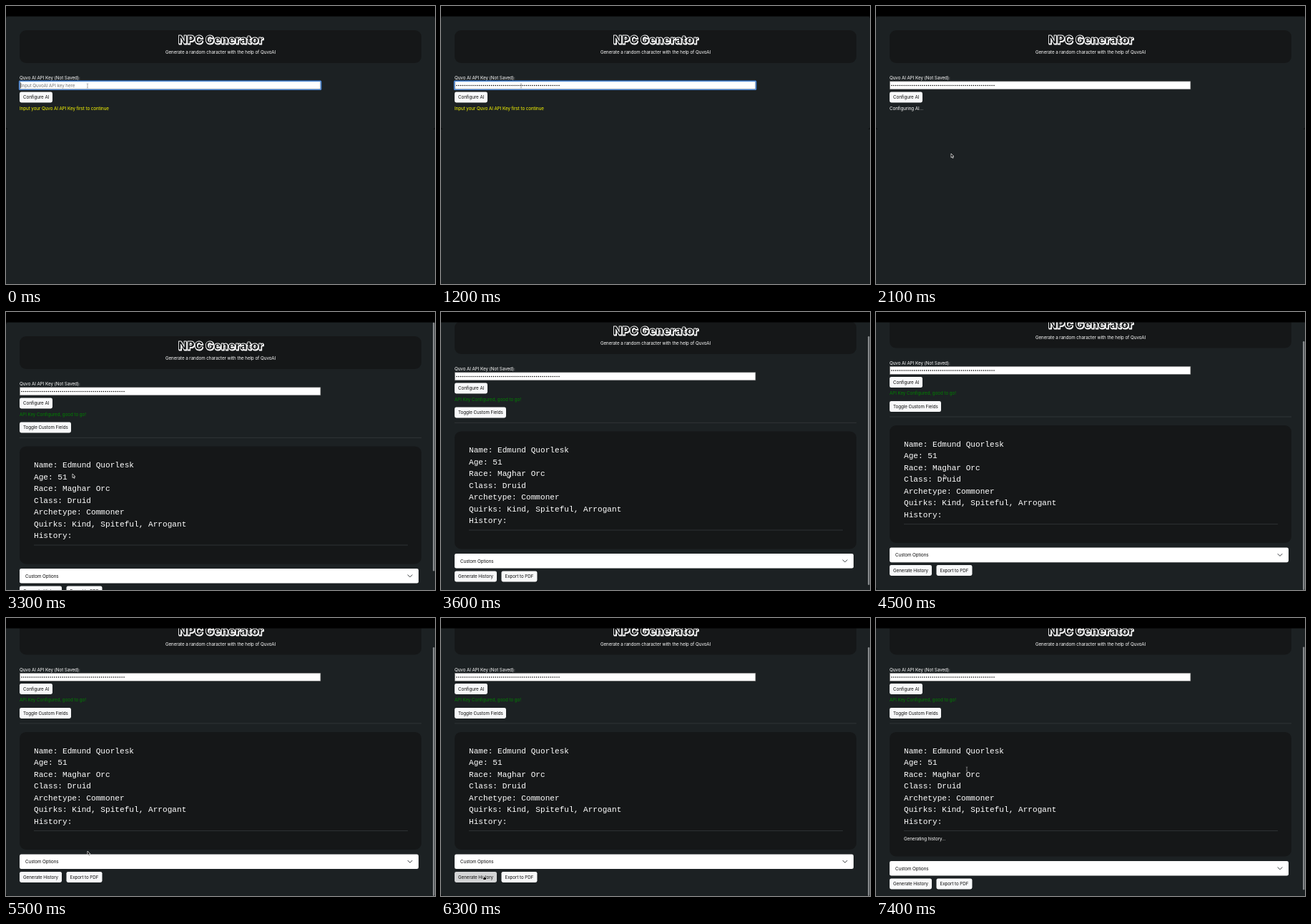
An HTML page for the animation above (8 s loop, 600 by 390 pixels).

```html
<!DOCTYPE html>
<html lang="en">
<head>
<meta charset="utf-8">
<title>NPC Generator</title>
<style>
  html, body { margin: 0; width: 100%; height: 100%; overflow: hidden; background: #000; }
  svg { display: block; width: 600px; height: 390px; }
  text { font: 6.25px Inter, sans-serif; letter-spacing: -.01em; fill: #fff; white-space: pre; }
  .title { font: 900 16px Inter, sans-serif; letter-spacing: 0; text-anchor: middle; stroke-linejoin: round; }
  .back { fill: #fff; stroke: #fff; stroke-width: 1; }
  .front { fill: #151718; stroke: #fff; stroke-width: .8; }
  .mid { text-anchor: middle; }
  .mono text { font: 11.11px "Liberation Mono", monospace; letter-spacing: 0; }
  .panel { fill: #151718; }
  .rule { stroke: #393d3f; stroke-width: .7; }
  .btn rect { fill: #f8f9fa; }
  .btn.hover rect { fill: #d3d4d5; }
  .btn text, .dark { fill: #0b0b0b; }
  #hint { fill: #757575; }
  #dots { stroke: #000; stroke-width: 1.6; stroke-linecap: round; stroke-dasharray: 0 2.86; }
  #ring { fill: none; stroke: #4a8ade; stroke-width: 1.4; }
  .cursor { stroke: #fff; stroke-width: .7; stroke-linejoin: round; }
</style>
</head>
<body>
<svg viewBox="0 0 600 390">
  <rect width="600" height="390" fill="#1c2123"/>
  <g id="page">
    <rect id="edge" y="14.5" width="600" fill="#090b0c"/>
    <rect id="sheet" y="14.5" width="600" rx="4" fill="#1c2123"/>

    <rect class="panel" x="19" y="34" width="562" height="46" rx="9"/>
    <text class="title back" x="301.1" y="53.6">NPC Generator</text>
    <text class="title front" x="300.4" y="52.8">NPC Generator</text>
    <text class="mid" x="300" y="67.2">Generate a random character with the help of QuvoAI</text>

    <text x="19" y="103">Quvo AI API Key (Not Saved):</text>
    <rect x="19.3" y="105.8" width="420.6" height="11" fill="#fff" stroke="#767676" stroke-width=".6"/>
    <rect id="ring" x="18.6" y="105.2" width="422" height="12.2" rx=".8"/>
    <text id="hint" x="21" y="113.7">Input QuvoAI API key here</text>
    <path id="dots" d="M22 111.5H165.5"/>
    <path id="caret" d="M0 107.5v7.6" stroke="#222" stroke-width=".7"/>
    <g class="btn" id="configure">
      <rect x="19" y="120.5" width="46" height="15" rx="2.4"/>
      <text x="24" y="130.3">Configure AI</text>
    </g>
    <text id="status" x="19" y="145.8"></text>

    <g id="result">
      <g class="btn">
        <rect x="19" y="154.5" width="72" height="15" rx="2.4"/>
        <text x="24" y="164.3">Toggle Custom Fields</text>
      </g>
      <path class="rule" d="M19 176.4H581"/>
      <rect id="card" class="panel" x="19" y="188.4" width="562" rx="9"/>
      <g class="mono" id="facts"></g>
      <path class="rule" d="M39 327H562"/>
      <text id="history" x="39" y="340.6">Generating history...</text>
      <g id="tail">
        <rect x="19" y="360" width="558" height="20.6" rx="2.4" fill="#fff"/>
        <text class="dark" x="27" y="372.5">Custom Options</text>
        <path d="M562 368.8l3 3 3-3" fill="none" stroke="#212529" stroke-width=".9" stroke-linecap="round" stroke-linejoin="round"/>
        <g class="btn" id="generate">
          <rect x="19" y="384.4" width="59" height="15" rx="2.4"/>
          <text x="24" y="394.2">Generate History</text>
        </g>
        <g class="btn">
          <rect x="84.5" y="384.4" width="50" height="15" rx="2.4"/>
          <text x="89.5" y="394.2">Export to PDF</text>
        </g>
      </g>
    </g>
  </g>
  <rect id="thumb" x="597" width="2.4" rx="1.2" fill="#85888a"/>
  <rect width="600" height="14.5"/>

  <g id="mouse">
    <path id="arrow" class="cursor" d="M0 0V5.6L1.3 4.4 2.2 6.5 3.2 6 2.3 4H4Z"/>
    <path id="hand" class="cursor" d="M-.6 0Q0-.7 .6 0V2.3L3 2.9Q3.6 3.1 3.5 4L3 6.5H-.4L-2 4Q-1.5 3-.6 4Z"/>
    <g id="beam" fill="none">
      <path d="M-1.2-3Q0-3 0-2.3Q0-3 1.2-3M0-2.3V2.3M-1.2 3Q0 3 0 2.3Q0 3 1.2 3" stroke="#999" stroke-width=".8"/>
    </g>
  </g>
</svg>
<script>
const LOOP = 8000, STEP = 100, VIEW = 375.5, TOP = 14.5;
const $ = id => document.getElementById(id);
const show = (id, on) => $(id).style.display = on ? '' : 'none';
const set = (id, name, value) => $(id).setAttribute(name, value);

const facts = ['Name: Edmund Quorlesk', 'Age: 51', 'Race: Maghar Orc', 'Class: Druid',
  'Archetype: Commoner', 'Quirks: Kind, Spiteful, Arrogant', 'History:'];
$('facts').innerHTML = facts.map((line, i) =>
  `<text x="39" y="${218.4 + i * 16.5}">${line}</text>`).join('');

// Stops are [time, value, ...], joined by straight segments.
const scrollStops = [[3400, 0], [3500, 10], [3600, 21], [3700, 28], [3800, 30],
  [3900, 29.8], [4500, 29.4], [5200, 28.5]];
const mouseStops = [[0, 114, 112], [1200, 112, 112], [1500, 46, 128], [1900, 46, 128],
  [2000, 80, 180], [2100, 105, 207], [3100, 105, 207], [3300, 93, 227], [4300, 93, 227],
  [4400, 95, 228], [5200, 95, 228], [5300, 114, 327], [5500, 114, 327], [5900, 60, 361],
  [6900, 60, 361], [7200, 105, 265], [7400, 127, 212]];

function at(stops, t) {
  const next = stops.findIndex(s => s[0] > t);
  if (next === 0) return stops[0].slice(1);
  if (next < 0) return stops[stops.length - 1].slice(1);
  const a = stops[next - 1], b = stops[next], k = (t - a[0]) / (b[0] - a[0]);
  return a.slice(1).map((v, i) => v + (b[i + 1] - v) * k);
}

function status(t) {
  if (t < 1600) return ['Input your Quvo AI API Key first to continue', '#ff0'];
  if (t < 2600) return ['Configuring AI...', '#fff'];
  return ['API Key Configured, good to go!', '#008000'];
}

function draw(t) {
  const pasted = t >= 700, focused = t < 1600, ready = t >= 2600, writing = t >= 7000;
  const grow = writing ? 9.5 : 0;
  const height = (ready ? 404 : 158.5) + grow;
  const [scroll] = at(scrollStops, t), [x, y] = at(mouseStops, t);

  set('page', 'transform', `translate(0 ${-scroll})`);
  set('edge', 'height', height);
  set('sheet', 'height', height);
  show('ring', focused);
  show('hint', !pasted);
  show('dots', pasted);
  show('caret', focused && (t < 300 || pasted && t < 1200));
  set('caret', 'transform', `translate(${pasted ? 168 : 20.6} 0)`);

  const [message, color] = status(t);
  $('status').textContent = message;
  $('status').style.fill = color;

  show('result', ready);
  set('card', 'height', 165 + grow);
  show('history', writing);
  set('tail', 'transform', `translate(0 ${grow})`);

  const ratio = VIEW / height;
  show('thumb', ready);
  set('thumb', 'y', TOP + Math.min(scroll, height - VIEW) * ratio);
  set('thumb', 'height', VIEW * ratio);

  const onConfigure = t >= 1400 && t < 2000, onGenerate = t >= 5800 && t < 7100;
  $('configure').classList.toggle('hover', onConfigure);
  $('generate').classList.toggle('hover', onGenerate);
  const hand = onConfigure || onGenerate, beam = t < 1300 || t >= 7300;
  set('mouse', 'transform', `translate(${x} ${y})`);
  show('hand', hand);
  show('beam', beam);
  show('arrow', !hand && !beam);
}

function tick() {
  draw(Math.floor(performance.now() % LOOP / STEP) * STEP);
  requestAnimationFrame(tick);
}
tick();
</script>
</body>
</html>
```
